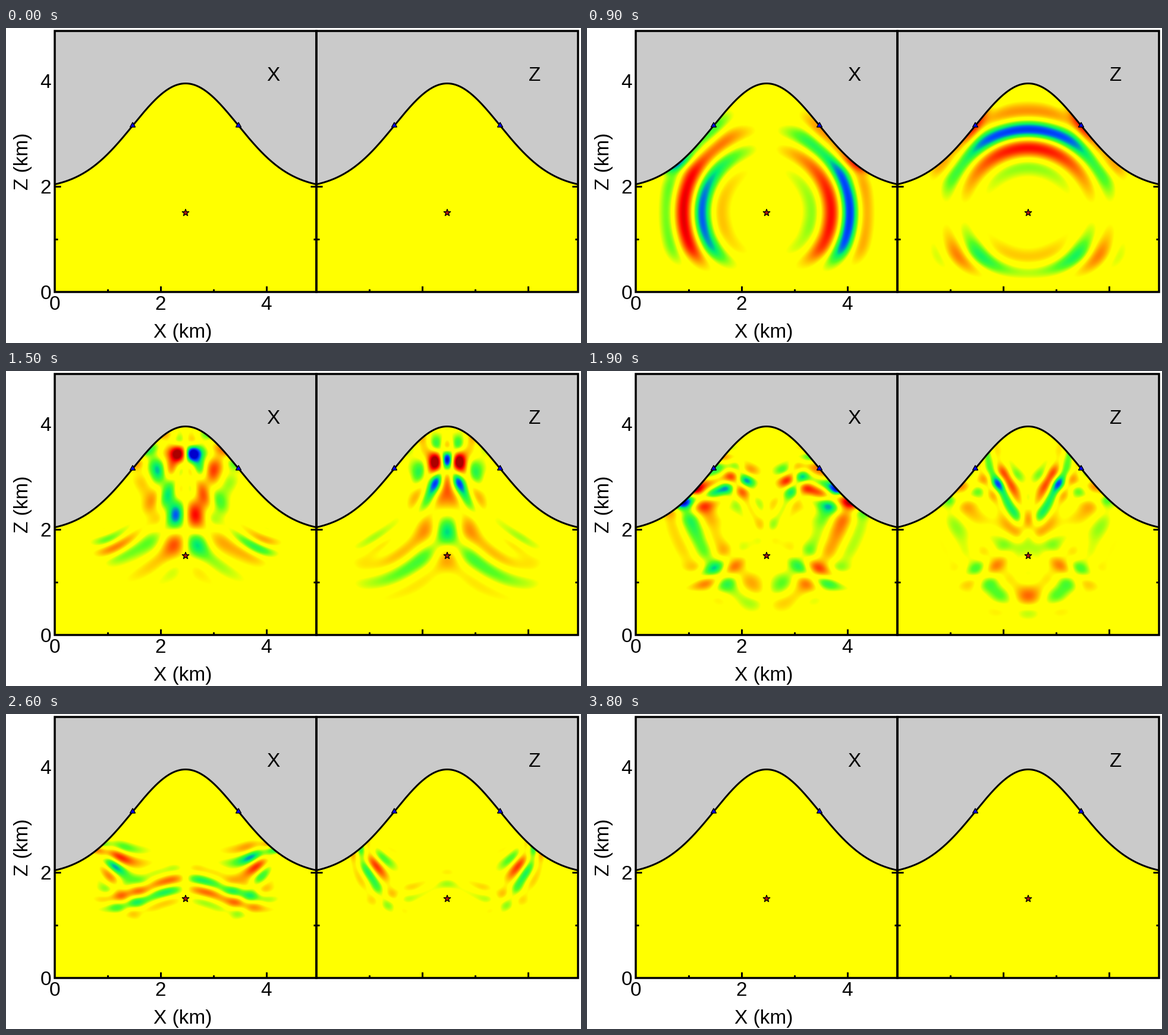
A matplotlib script that plays this animation: 967x531 px, repeating every 4000 ms.

```python
import numpy as np
import matplotlib.pyplot as plt
from matplotlib.animation import FuncAnimation
from matplotlib.colors import LinearSegmentedColormap
from matplotlib.patches import Polygon, Rectangle

plt.rcParams["font.family"] = "Liberation Sans"

# Stage geometry in pixels
WIDTH, HEIGHT, DPI = 967, 531, 100
PX_PER_KM, PANEL = 89, 440
LEFTS, TOP, BOTTOM = (82, 522), 5, 445
SIDE = PANEL / PX_PER_KM
MID = SIDE / 2

# Elastic medium, explosive source and grid (km, s)
VP, VS, FREQ, DELAY = 3.0, 3.0 / 3 ** 0.5, 2.5, 0.4
SOURCE_Z = 1.506
FRAMES, FRAME_DT, STEPS = 40, 0.1, 36
NX = 313
DX = SIDE / (NX - 1)
NZ = int(4.0 / DX) + 2
SPONGE, SPONGE_RATE = 0.9, 20


def surface(x):
    return 1.95 + 2.0 * np.exp(-0.51 * (x - MID) ** 2)


def wavelet(t):
    """Fourth derivative of a Gaussian."""
    a = (np.pi * FREQ * (t - DELAY)) ** 2
    return (16 * a * a - 48 * a + 12) * np.exp(-a)


def simulate():
    """Staggered-grid velocity-stress solver with vacuum above the surface."""
    x, z = np.arange(NX) * DX, np.arange(NZ)[:, None] * DX
    rock = (z <= surface(x)).astype(np.float32)
    dt = FRAME_DT / STEPS
    c = dt / DX

    def buoyancy(total):
        return (c * np.where(total > 0, 2 / np.maximum(total, 1), 0)).astype(np.float32)

    bx = buoyancy(rock[1:, 1:] + rock[1:, :-1])
    bz = buoyancy(rock[1:, 1:] + rock[:-1, 1:])
    p_mod = rock[1:, 1:] * np.float32(c * VP ** 2)
    lam = rock[1:, 1:] * np.float32(c * (VP ** 2 - 2 * VS ** 2))
    mu = rock[1:, 1:] * rock[1:, :-1] * rock[:-1, 1:] * rock[:-1, :-1] * np.float32(c * VS ** 2)

    sx = np.maximum(0, SPONGE - np.minimum(x, SIDE - x))
    sz = np.maximum(0, SPONGE - z)
    damp = np.exp(-VP * SPONGE_RATE * (sx ** 2 + sz ** 2) * dt).astype(np.float32)

    vx, vz, sxx, szz, sxz = fields = [np.zeros((NZ, NX), np.float32) for _ in range(5)]
    row, col = round(SOURCE_Z / DX), NX // 2
    shots = []
    for step in range((FRAMES - 1) * STEPS):
        if step % STEPS == 0:
            shot = np.zeros((2, NZ, NX), np.float32)
            shot[0, :, 1:] = (vx[:, 1:] + vx[:, :-1]) / 2
            shot[1, 1:] = (vz[1:] + vz[:-1]) / 2
            shots.append(shot)
        vx[1:, :-1] += bx * (sxx[1:, 1:] - sxx[1:, :-1] + sxz[1:, :-1] - sxz[:-1, :-1])
        vz[:-1, 1:] += bz * (szz[1:, 1:] - szz[:-1, 1:] + sxz[:-1, 1:] - sxz[:-1, :-1])
        ex = vx[1:, 1:] - vx[1:, :-1]
        ez = vz[1:, 1:] - vz[:-1, 1:]
        sxx[1:, 1:] += p_mod * ex + lam * ez
        szz[1:, 1:] += lam * ex + p_mod * ez
        sxz[:-1, :-1] += mu * (vx[1:, :-1] - vx[:-1, :-1] + vz[:-1, 1:] - vz[:-1, :-1])
        push = wavelet(step * dt) * dt
        sxx[row, col] += push
        szz[row, col] += push
        for field in fields:
            field *= damp

    # Scale so the leading upward lobe has a known strength at 0.6 s
    lobe = shots[6][1, round((SOURCE_Z + 1.03) / DX), col]
    shots = [shot * (0.55 / lobe) for shot in shots]
    shots[1] = shots[0]
    return shots + [shots[-1]] * (FRAMES - len(shots))


seis = LinearSegmentedColormap.from_list("seis", [
    tuple(v / 255 for v in rgb) for rgb in (
        (0, 0, 205), (0, 80, 255), (0, 240, 110), (90, 255, 30), (255, 255, 0),
        (255, 255, 0), (255, 170, 0), (255, 85, 0), (255, 0, 0), (170, 0, 0))], N=512)

shots = simulate()

fig = plt.figure(figsize=(WIDTH / DPI, HEIGHT / DPI), dpi=DPI, facecolor="white")
ax = fig.add_axes([0, 0, 1, 1])
ax.axis("off")


def pt(px):
    return px * 72 / DPI


def line(xs, ys, width=3):
    ax.plot(xs, ys, color="black", lw=pt(width), solid_capstyle="butt", zorder=3)


def label(x, y, text, rotation=0):
    ax.text(x, y, text, size=24, ha="center", va="baseline",
            rotation=rotation, rotation_mode="anchor", zorder=6)


def to_y(z):
    return BOTTOM - z * PX_PER_KM


def draw_panel(left, name):
    right = left + PANEL
    half = DX / 2
    image = ax.imshow(
        shots[0][0], cmap=seis, vmin=-1, vmax=1, origin="lower", aspect="auto",
        interpolation="bilinear", zorder=1,
        extent=(left - half * PX_PER_KM, right + half * PX_PER_KM,
                to_y(-half), to_y((NZ - 0.5) * DX)))
    x = np.linspace(0, SIDE, 300)
    px, py = left + x * PX_PER_KM, to_y(surface(x))
    sky = [(left, TOP), *zip(px, py), (right, TOP)]
    ax.add_patch(Polygon(sky, fc="#cacaca", ec="none", zorder=2))
    line(px, py)
    for km in range(1, 5):
        size = 5 if km % 2 else 10
        line([left + km * PX_PER_KM] * 2, [BOTTOM, BOTTOM - size])
        if km < 3:
            line([left, left + size], [to_y(km)] * 2)
            line([right - size, right], [to_y(km)] * 2)
    for km in (MID - 1, MID + 1):
        cx, cy = left + km * PX_PER_KM, to_y(surface(km)) - 1
        ax.add_patch(Polygon([(cx - 4.5, cy + 3.5), (cx + 4.5, cy + 3.5), (cx, cy - 4.5)],
                             fc="blue", ec="black", lw=pt(1.4), zorder=5))
    angle = np.arange(10) * np.pi / 5
    radius = np.where(np.arange(10) % 2, 2.5, 6.3)
    star = np.c_[left + PANEL / 2 + radius * np.sin(angle),
                 to_y(SOURCE_Z) + 0.5 - radius * np.cos(angle)]
    ax.add_patch(Polygon(star, fc="#b01810", ec="black", lw=pt(1.3), zorder=5))
    ax.add_patch(Rectangle((left, TOP), PANEL, PANEL, fc="none", ec="black",
                           lw=pt(3.5), zorder=4))
    label(left + 367, 89, name)
    return image


images = [draw_panel(left, name) for left, name in zip(LEFTS, "XZ")]
for km in (0, 2, 4):
    label(67, to_y(km) + 12, str(km))
    label(LEFTS[0] + km * PX_PER_KM, 475, str(km))
label(297, 522, "X (km)")
label(37, 225, "Z (km)", rotation=90)
ax.set_xlim(0, WIDTH)
ax.set_ylim(HEIGHT, 0)


def update(frame):
    for image, field in zip(images, shots[frame]):
        image.set_data(field)
    return images


animation = FuncAnimation(fig, update, frames=FRAMES, interval=100,
                          repeat=True, repeat_delay=0, blit=False)
plt.show()
```
